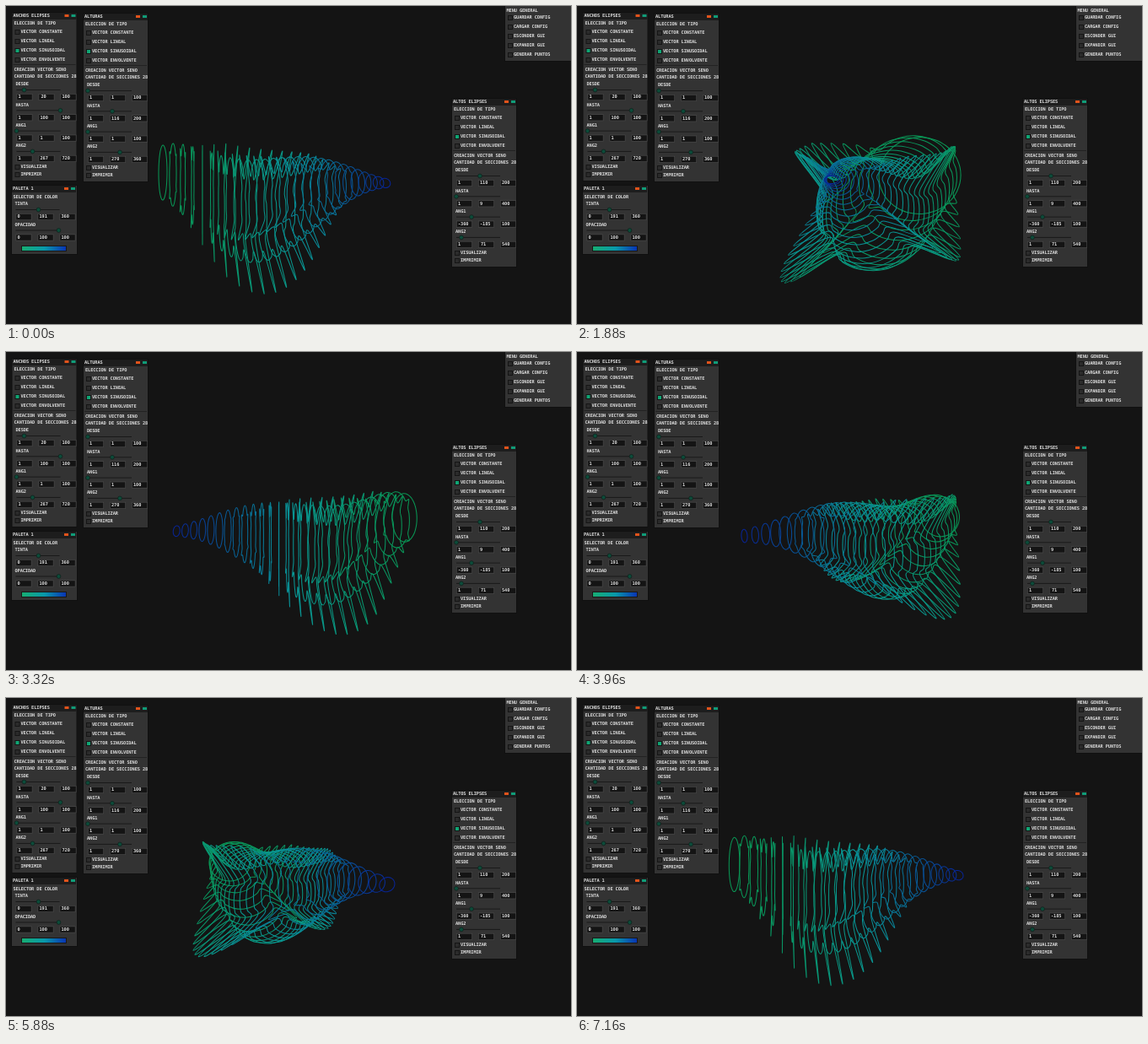
Animation, 670 px wide and 377 px high, one loop 7200 ms. Source, as an HTML page with a canvas:

```html
<!DOCTYPE html>
<html lang="es">
<head>
<meta charset="utf-8">
<style>
html, body { margin: 0; width: 100%; height: 100%; overflow: hidden; background: #141414; }
canvas { display: block; }
</style>
</head>
<body>
<canvas id="stage" width="670" height="377"></canvas>
<script>
const LOOP = 7200, STEP = 40, RINGS = 28, DEPTH = 357;
const stage = document.getElementById('stage');
const rad = deg => deg * Math.PI / 180;
const lerp = (a, b, k) => a + (b - a) * k;

// ---------- control panels ----------
const gui = document.createElement('canvas');
gui.width = 670;
gui.height = 377;
const g = gui.getContext('2d');

function rect(x, y, w, h, fill) {
  g.fillStyle = fill;
  g.fillRect(x, y, w, h);
}

function label(text, x, y) {
  g.fillStyle = '#dedede';
  g.fillText(text, x, y);
}

function panel(x, y, w, h) {
  rect(x, y, w, h, '#101010');
  rect(x + 1, y + 1, w - 2, h - 2, '#333');
}

function titleBar(title, x, y) {
  rect(x + 1, y + 1, 76, 8, '#1d1d1d');
  label(title, x + 2, y + 4.5);
  rect(x + 63, y + 3, 5, 3, '#e2531b');
  rect(x + 71, y + 3, 5, 3, '#109c78');
}

function check(text, x, y, on) {
  rect(x, y - 3, 6, 6, '#151515');
  rect(x + 1, y - 2, 4, 4, on ? '#10a574' : '#2b2b2b');
  label(text, x + 7, y);
}

function slider(name, x, y, knob, values) {
  label(name, x, y);
  rect(x + 1, y + 6, 52, 1, '#191919');
  g.beginPath();
  g.arc(x + knob, y + 6.5, 2.4, 0, 7);
  g.fillStyle = '#0c4c3a';
  g.fill();
  g.lineWidth = 0.7;
  g.strokeStyle = '#111f1a';
  g.stroke();
  values.forEach((v, k) => {
    const bx = x + 1 + 26 * k;
    rect(bx, y + 11, 19, 8, '#484848');
    rect(bx + 0.7, y + 11.7, 17.6, 6.6, '#141414');
    label(v, bx + 2 + (v > 9 && v < 100 ? 1 : 0), y + 15);
  });
}

function vectorPanel(title, x, y, knobs, values) {
  panel(x, y, 78, 201);
  titleBar(title, x, y);
  label('ELECCION DE TIPO', x + 3, y + 13.5);
  ['CONSTANTE', 'LINEAL', 'SINUSOIDAL', 'ENVOLVENTE'].forEach((type, k) =>
    check('VECTOR ' + type, x + 4, y + 24 + 11 * k, k === 2));
  rect(x + 2, y + 62, 74, 1, '#222');
  label('CREACION VECTOR SENO', x + 3, y + 68.5);
  label('CANTIDAD DE SECCIONES 28', x + 3, y + 77);
  ['DESDE', 'HASTA', 'ANG1', 'ANG2'].forEach((name, k) =>
    slider(name, x + 5, y + 86 + 24.3 * k, knobs[k], values[k]));
  check('VISUALIZAR', x + 4, y + 184);
  check('IMPRIMIR', x + 4, y + 193);
}

function drawGui() {
  rect(0, 0, 670, 377, '#141414');
  g.font = 'bold 5.3px "DejaVu Sans Mono", monospace';
  g.letterSpacing = '-0.1px';
  g.textBaseline = 'middle';

  vectorPanel('ANCHOS ELIPSES', 6.5, 7, [10, 53, 1, 20],
    [[1, 20, 100], [1, 100, 100], [1, 1, 100], [1, 267, 720]]);
  vectorPanel('ALTURAS', 91, 8, [1, 30, 1, 39],
    [[1, 1, 100], [1, 116, 200], [1, 1, 100], [1, 270, 360]]);
  vectorPanel('ALTOS ELIPSES', 528, 109, [29, 1, 19, 7],
    [[1, 110, 200], [1, 9, 400], [-360, -185, 100], [1, 71, 540]]);

  panel(6, 212, 79, 83);
  titleBar('PALETA 1', 6, 212);
  label('SELECTOR DE COLOR', 8.5, 226.5);
  slider('TINTA', 10.5, 235, 28, [0, 191, 360]);
  slider('OPACIDAD', 10.5, 259.5, 52, [0, 100, 100]);
  const bar = g.createLinearGradient(19, 0, 72, 0);
  bar.addColorStop(0, '#17ad72');
  bar.addColorStop(0.5, '#0999aa');
  bar.addColorStop(1, '#0930b4');
  rect(18, 284, 54, 7, '#181818');
  rect(19, 285, 52, 5, bar);

  panel(591, -1, 80, 67);
  label('MENU GENERAL', 593.5, 5.5);
  ['GUARDAR CONFIG', 'CARGAR CONFIG', 'ESCONDER GUI', 'EXPANDIR GUI', 'GENERAR PUNTOS']
    .forEach((text, k) => check(text, 595, 14 + 11 * k));
}

// ---------- spiked tube ----------
// Each ring is an ellipse with one point per quarter pulled out into a spike.
const TIP = 32;
const QUARTER = [0, 13, 25, TIP, 40, 53, 70];
const MIRROR = [90, ...QUARTER.slice(1).reverse()];

function makeRing(i) {
  const k = i / (RINGS - 1);
  const wave = (from, to) => Math.sin(rad(lerp(from, to, k)));
  const a = (60 + 40 * wave(1, 267)) * 0.585;
  const h = (59.5 - 50.5 * wave(-185, 71)) * 0.525;
  const rise = (58.5 + 57.5 * wave(1, 270)) * 0.525;
  const spike = i < 22 ? Math.sin(Math.PI * (i / 22) ** 0.9) : 0;
  const cy = 8 + 15.5 * k + 38 * Math.sin(Math.PI * k ** 0.65) ** 3;
  const points = [];
  for (let q = 0; q < 4; q++) {
    const sx = q === 0 || q === 3 ? 1 : -1, sy = q < 2 ? 1 : -1;
    for (const angle of q % 2 ? MIRROR : QUARTER) {
      let w = a * Math.cos(rad(angle)), y = h * Math.sin(rad(angle));
      if (angle === TIP) {
        w = a * (0.85 + 0.66 * spike) * (1 + 0.08 * spike * sy);
        y = lerp(y, rise, Math.min(1, 1.2 * spike)) - 4 * spike * sy;
      }
      points.push([sx * w, cy + sy * y]);
    }
  }
  return {
    u: lerp(138, -131, k),
    points,
    color: `hsl(${152 + 76 * k ** 1.4}, 88%, 31%)`
  };
}

const rings = Array.from({ length: RINGS }, (_, i) => makeRing(i));
const ctx = stage.getContext('2d');

function closedCurve(p) {
  const n = p.length;
  ctx.beginPath();
  ctx.moveTo(...p[0]);
  for (let i = 0; i < n; i++) {
    const [p0, p1, p2, p3] = [n - 1, 0, 1, 2].map(d => p[(i + d) % n]);
    ctx.bezierCurveTo(
      p1[0] + (p2[0] - p0[0]) / 6, p1[1] + (p2[1] - p0[1]) / 6,
      p2[0] - (p3[0] - p1[0]) / 6, p2[1] - (p3[1] - p1[1]) / 6,
      p2[0], p2[1]);
  }
  ctx.closePath();
  ctx.stroke();
}

function draw(now) {
  const t = Math.floor(now % LOOP / STEP) * STEP;
  const turn = rad(360 * t / LOOP - 74);
  const s = Math.sin(turn), c = Math.cos(turn);
  ctx.drawImage(gui, 0, 0);
  ctx.lineWidth = 1.05;
  ctx.lineJoin = 'round';
  for (const { u, points, color } of rings) {
    ctx.strokeStyle = color;
    closedCurve(points.map(([w, y]) => {
      const d = 1 - (u * c - w * s) / DEPTH;
      return [335 + (u * s + w * c) / d, 188.5 + y / d];
    }));
  }
}

drawGui();
const start = performance.now();
function tick() {
  draw(performance.now() - start);
  requestAnimationFrame(tick);
}
tick();
</script>
</body>
</html>
```
